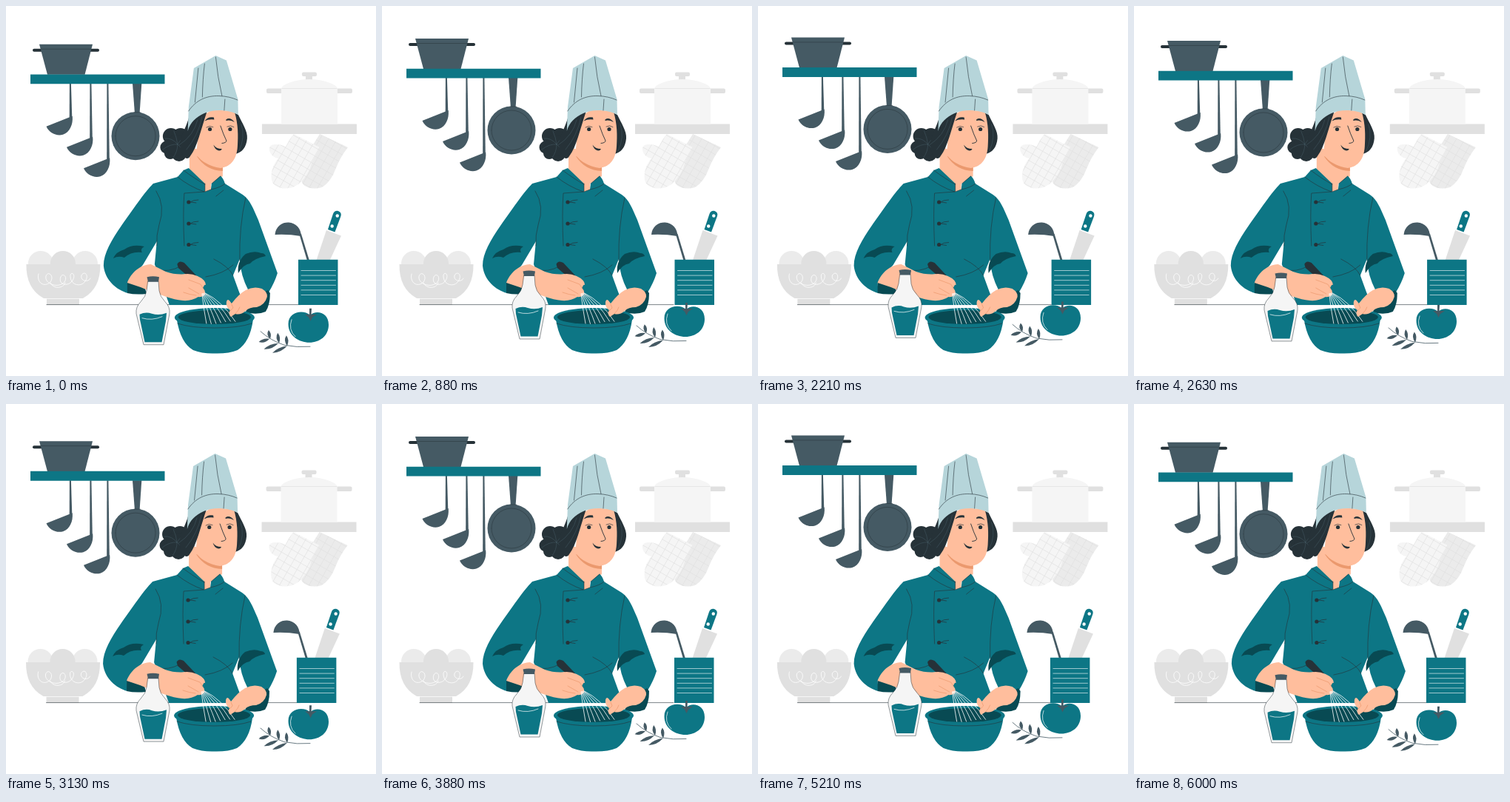
These frames come from a looping animation (500 by 500 pixels, 6.04 s). An HTML page with a canvas:

```html
<!DOCTYPE html>
<html lang="en">
<head>
<meta charset="utf-8">
<title>Chef</title>
<style>
html, body { margin: 0; width: 100%; height: 100%; overflow: hidden; background: #fff; }
canvas { display: block; width: 500px; height: 500px; }
</style>
</head>
<body>
<canvas id="stage" width="500" height="500"></canvas>
<script>
const ctx = document.getElementById('stage').getContext('2d');
const TEAL = '#0d7685', DEEP = '#084a53', HAT = '#b6d5da', SLATE = '#455a64', INK = '#263238';
const SKIN = '#ffbe9d', SHADE = '#eb996e', G1 = '#e0e0e0', G2 = '#ebebeb', G3 = '#f5f5f5';
const LOOP = 6040, STEP = 40;

const cache = {};
const shape = d => cache[d] || (cache[d] = new Path2D(d));

function fill(color, d) {
  ctx.fillStyle = color;
  ctx.fill(shape(d));
}

function line(color, width, d) {
  ctx.strokeStyle = color;
  ctx.lineWidth = width;
  ctx.stroke(shape(d));
}

function ellipse(color, x, y, rx, ry = rx) {
  ctx.fillStyle = color;
  ctx.beginPath();
  ctx.ellipse(x, y, rx, ry, 0, 0, Math.PI * 2);
  ctx.fill();
}

function box(color, x, y, w, h, r = 0) {
  ctx.fillStyle = color;
  ctx.beginPath();
  ctx.roundRect(x, y, w, h, r);
  ctx.fill();
}

function at(x, y, draw) {
  ctx.save();
  ctx.translate(x, y);
  draw();
  ctx.restore();
}

// Up and back down by 10 px at constant speed.
function float(t) {
  const p = t % 1500 / 1500;
  return -10 * (1 - Math.abs(1 - 2 * p));
}

// Sideways shake through eleven evenly spaced stops.
const STOPS = [0, -1, 2, -4, 4, -4, 4, -4, 2, -1, 0];
function shake(t, period) {
  const p = t % period / period * 10, i = Math.floor(p);
  return STOPS[i] + (STOPS[i + 1] - STOPS[i]) * (p - i);
}

function mittGrid(clip, color, x, y) {
  ctx.save();
  ctx.clip(shape(clip));
  ctx.translate(x, y);
  ctx.rotate(0.52);
  ctx.strokeStyle = color;
  ctx.lineWidth = 0.6;
  ctx.beginPath();
  for (let k = -60; k <= 60; k += 10) {
    ctx.moveTo(k, -70); ctx.lineTo(k, 70);
    ctx.moveTo(-70, k); ctx.lineTo(70, k);
  }
  ctx.stroke();
  ctx.restore();
}

function greyWare() {
  box(G1, 346, 159.5, 128, 13.5);
  box(G1, 352, 111.5, 24, 6.5, 2);
  box(G1, 444, 111.5, 24, 6.5, 2);
  box(G1, 405, 92, 9, 10);
  box(G1, 400, 89.5, 20, 5.5, 2);
  fill(G3, 'M372 159.5V112Q373 107 382 104Q395 99 410 99Q425 99 438 104Q447 107 448 112V159.5Z');
  line(G1, 0.7, 'M373 111.5H447');

  const back = 'M424 173L462 191Q452 204 446 219Q439 238 427 245Q414 249 404 243Q396 237 401 224Q410 210 409 200Q415 186 424 173Z';
  fill(G2, back);
  mittGrid(back, G1, 430, 210);
  const front = 'M389 173L424 191Q414 206 411 220Q402 239 388 245Q373 249 363 242Q357 236 359 225Q361 214 368 206Q358 204 356 195Q355 187 364 187Q372 187 378 190Q382 181 389 173Z';
  fill(G3, front);
  mittGrid(front, G1, 390, 210);

  ellipse(G2, 47, 348, 17);
  ellipse(G2, 107, 348, 17);
  ellipse(G1, 77, 348, 17);
  box(G1, 55, 392, 44, 12);
  fill(G1, 'M27.5 349H127.5Q128 382 104 395H51Q27 382 27.5 349Z');
  line('#fff', 0.7, 'M55 395.5H99');
  line('#fff', 0.8, 'M44 362C41 374 52 381 60 373C66 365 57 357 54 365C52 376 71 382 79 373C84 366 77 360 74 366C70 377 84 380 90 371C96 361 86 358 87 366C88 378 102 380 107 372C113 364 106 357 102 364C100 372 112 374 114 368M60 374C64 383 78 382 80 374');
  line(INK, 0.6, 'M55 403.6H398');
}

function hangingLadle() {
  fill(SLATE, 'M54.5 163L89.7 149C91 160 86 171 77 174C68 176.5 58 171.5 54.5 163Z');
}

function shelf() {
  box(INK, 36, 58, 90, 4, 2);
  fill(SLATE, 'M45 52H117L106.5 93H56Z');
  line(INK, 0.5, 'M47 58.5H115');
  [[0, 0], [27.5, 28], [50.5, 56.5]].forEach(([x, y]) => {
    at(x, y, hangingLadle);
    const sx = 86.7 + x;
    fill(SLATE, `M${sx - 0.8} 105H${sx + 1.2}L${sx + 2.6} ${151 + y}L${sx - 1} ${153 + y}Z`);
  });
  fill(SLATE, 'M171 105H183.3L180.5 146H174Z');
  ellipse(SLATE, 175, 176, 32.5);
  line(INK, 0.5, 'M148 176a27 27 0 1 0 54 0a27 27 0 1 0 -54 0M173 144H181.5');
  box(TEAL, 33, 92.7, 181.5, 12.9);
}

function hair() {
  const lobes = [[223, 176, 11], [236, 177, 12], [217, 191, 8.5], [222, 199, 8], [234, 200, 10], [246, 190, 9.5], [231, 188, 14]];
  lobes.forEach(([x, y, r]) => ellipse(INK, x, y, r));
  line(SLATE, 0.5, 'M232 187Q225 178 215 179M232 187Q222 186 212 194M232 187Q232 197 226 205M232 187Q240 193 242 203M232 187Q237 178 244 177M232 187Q231 178 227 169');
  fill(INK, 'M306 143L314 147C319 158 327 169 326 179C325 191 319 198 310 200Z');
  line(SLATE, 0.5, 'M318 160Q324 177 315 196');
}

function face() {
  fill(SKIN, 'M248 190V222L268 242V253L277 249V240L293 230V205Z');
  fill(SHADE, 'M258 203Q270 222 293 223V214Z');
  fill(SKIN, 'M264 150C258 169 260 185 257 199C261 209 276 217 290 219C305 217 312 206 313 190C314 175 314 160 309 143L280 139Z');
  fill(INK, 'M248 148C243 168 234 176 236 192C238 206 246 209 249 203C259 190 263 168 272 142Z');
  line(SLATE, 0.5, 'M259 154Q254 175 234 188M265 150Q260 175 244 194');
  fill(INK, 'M268.5 155.5Q273 149 281 150.5L281.5 153.5Q274 152.5 268.5 155.5Z');
  fill(INK, 'M297.5 153.5Q303 149.5 309 157Q303 153.5 297.5 155Z');
  ellipse(INK, 275.7, 166.5, 2.6);
  ellipse(INK, 303, 166.5, 2.6);
  line(INK, 0.7, 'M271 164Q275 161 280 163.5M299 163Q304 160.5 308 163.5');
  line(INK, 0.9, 'M290 162Q294 174 298 182Q298 185 292 185.5');
  fill(INK, 'M280.5 187.5Q284 193 292 193Q291 195.5 288 195.5Q282 194 280.5 187.5Z');
}

function hat() {
  fill(HAT, 'M254 84L283.5 67L298 73.5L313.5 126L314 147C301 140 281 139 268 145C257 150 249 157 245.8 169L247 136Z');
  line(INK, 0.6, 'M246.8 142C257 127 271 121 288 121.5Q302 122 313 127M260 84L255.5 130M268.5 78Q266 98 265.5 123M283.5 69Q286 96 292 121.5M296 126L295 141');
}

function coat() {
  fill(TEAL, 'M240 222L247 219L269 240V251L277 248L278 240L290 229.5Q294 233 296 240L320 255C330 262 334 273 341 289L367 361Q363 374 355 387L328 385Q317 364 316 342L307 364L315 386L322 404H221L204 357L201 349L204 318L185 350L164 374L165 388C150 384 134 371 132 351C132 334 143 316 156 297C171 276 187 252 199 240L232 231Z');
  // openings of the cuffs
  fill(DEEP, 'M164 373Q175 376 188 381L190 389Q175 390.5 164 388Z');
  fill(DEEP, 'M354 384L357 388Q357 404 351 413Q340 418 324 414L328 399Z');
  // sleeve folds
  fill(DEEP, 'M145 341Q149 332 160 329Q171 321 187 325Q181 328 184 333Q170 331 160 340Q152 337 145 341Z');
  fill(DEEP, 'M314 361Q312 345 324 335Q336 330 345 334Q350 334 351 338Q336 341 330 348Q321 349 314 361Z');
  line(INK, 0.6, 'M203 250Q216 270 207 296Q203 310 204 324M324 259Q315 298 316 344M307 364Q301 352 281 342M204 356Q220 361 237 351M270 366Q294 362 307 350');
  line(INK, 0.6, 'M232 231Q248 244 268 251M240 222Q256 234 269 241M269 240V251L277 248Q291 245 296 240M278 240L290 230M268 251L241 253Q239 280 241 324M284 257L294 249');
  for (const y of [265, 294, 322.5]) {
    ellipse(INK, 247, y, 2.6);
    line(INK, 0.7, `M249 ${y}Q253 ${y - 3} 260 ${y - 3}M250 ${y}L257 ${y + 1}`);
  }
}

function arms() {
  fill(SKIN, 'M164 374C169 361 180 350 196 349L216 359Q230 364 245 362L262 367Q270 372 269 376L266 381Q271 386 268 391Q263 394 260 393Q251 399 239 398C224 397 210 390 199 387Q181 379 164 374Z');
  fill(INK, 'M231.5 349Q234 343 241 347L257 364Q254 368 247 366L233 354Z');
  fill(SKIN, 'M238 363Q248 360 259 365Q270 370 270 377L263 376L267 388Q265 393 258 390L240 378Z');
  line(SHADE, 0.7, 'M247 370L263 376L267 382M247 381L261 389M240 387Q248 390 257 391');
}

function whisk() {
  for (let i = 0; i < 7; i++) {
    const endX = 271 + i * 6.5, endY = 429 + Math.sin(i) - i * 0.4;
    line('#fff', 0.8, `M${265 + i * 0.7} ${389 - i * 0.2}Q${267 + i * 4.2} ${408 - i * 1.5} ${endX} ${endY}`);
  }
}

function rightHand() {
  fill(SKIN, 'M298 400Q299 395 302 398L305 402Q315 389 324 384Q335 378 346 382Q354 387 353 393Q350 404 339 407Q329 407 324 412Q317 418 310 416L304 420Q300 417 303 411Q297 407 298 400Z');
  line(SHADE, 0.7, 'M305 403L307 408L302 413M310 416Q315 411 316 407');
}

function mixingBowl() {
  fill(TEAL, 'M231 424Q236 455 253 465Q266 470 282 469.5Q301 470 313 465Q330 454 334 424Z');
  ellipse(TEAL, 282, 421, 54, 13);
  ellipse(DEEP, 282, 420.5, 49, 9.5);
  line(INK, 0.6, 'M232 429Q250 435 282 435Q315 435 332 429');
}

function chef() {
  hair();
  face();
  hat();
  coat();
  arms();
  mixingBowl();
  whisk();
  rightHand();
}

function utensils() {
  fill(SLATE, 'M363.5 309A17.6 17.6 0 0 1 398.7 311Q381 308 363.5 309Z');
  fill(SLATE, 'M396 307L399 308L410 344H407Z');
  fill(G1, 'M433 303L453 310.5L437 345H419Z');
  fill(TEAL, 'M435 302L442 281Q444 276 449 277Q454 279 452.5 284L444.5 305.5Z');
  ellipse('#fff', 447.8, 283.5, 2.2);
  ellipse('#fff', 440.7, 297.5, 2.2);
  box(TEAL, 395, 342.7, 53.5, 61.3);
  for (let i = 0; i < 6; i++) line('#fff', 0.6, `M399 ${357.5 + i * 6.6}H445.5`);
}

function tomato() {
  fill(TEAL, 'M411 418C418 411 436 413 436 431C436 446 424 455 410 455C396 455 381.5 446 381.5 430C381.5 413 402 410 411 418Z');
  line('#fff', 0.7, 'M386 424Q381 438 391 447');
  fill(SLATE, 'M410 409L413 409L412.5 417L420 417L414 421L411.5 426L409 421L404 417L410 417Z');
}

function sprig() {
  line(SLATE, 0.8, 'M344 440Q357 452 376 458.5Q393 462 411 460.5');
  const leaves = [[357, 450, -1.75, 12], [369, 456, -1.7, 14], [380, 459.5, -1.65, 14],
    [356, 450, 2.85, 15], [368, 456, 2.75, 21], [380, 459.5, 2.7, 22]];
  for (const [x, y, a, n] of leaves) {
    at(x, y, () => {
      ctx.rotate(a);
      fill(SLATE, `M0 0Q${n * 0.55} -5 ${n} 0Q${n * 0.55} 4 0 0Z`);
    });
  }
}

function bottle() {
  const glass = 'M192 372H206L207 385Q208 393 215 400Q222 407 221 416L213 458H186L176 416Q175 407 182 400Q189 393 190 385Z';
  fill(G3, glass);
  line(INK, 0.5, glass);
  fill(TEAL, 'M180.5 417Q189 413 197 416Q207 419 217 415L216 426L210.5 454.5H187.5L181 424Z');
  line('#fff', 0.7, 'M184 422Q197 426 211 420');
  fill(SLATE, 'M190.5 366.5Q198.5 364.5 207 366.5L206 373H192Z');
}

function frame() {
  const t = Math.floor(performance.now() % LOOP / STEP) * STEP + STEP / 2;
  const up = float(t);
  ctx.fillStyle = '#fff';
  ctx.fillRect(0, 0, 500, 500);
  ctx.lineCap = ctx.lineJoin = 'round';
  at(shake(t, 3000), 0, greyWare);
  at(0, up, shelf);
  at(shake(t, 1500), 0, chef);
  at(shake(t, 6000), 0, utensils);
  at(0, up, () => {
    tomato();
    sprig();
    bottle();
  });
  requestAnimationFrame(frame);
}
frame();
</script>
</body>
</html>
```
